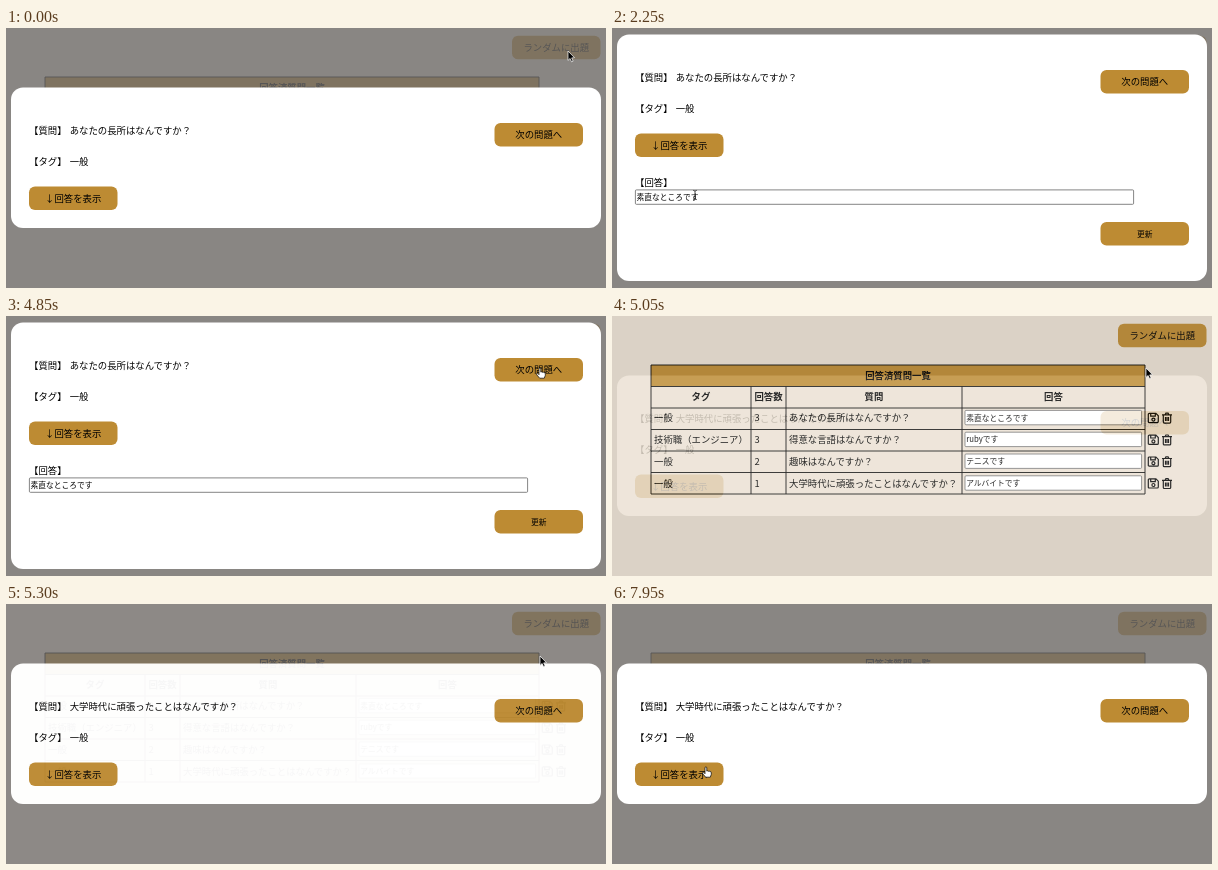
Write an HTML page that moves like this. It is 600 px wide and 260 px high and loops after 8000 ms.

```html
<!DOCTYPE html>
<html lang="ja">
<head>
<meta charset="utf-8">
<style>
html, body { margin: 0; width: 100%; height: 100%; overflow: hidden; }
svg { display: block; width: 100vw; height: 100vh; }
text { font-family: "Noto Sans CJK JP", "Noto Sans CJK", "Noto Sans", sans-serif; font-size: 9.4px; white-space: pre; }
.small { font-size: 7.75px; }
.bold { font-weight: 700; }
.mid { text-anchor: middle; }
</style>
</head>
<body>
<svg id="stage" viewBox="0 0 600 260" xmlns="http://www.w3.org/2000/svg"></svg>
<script>
const LOOP = 8000, STEP = 50;
const OPEN = 2250, CLOSE = 4950, FADE_START = 4945, FADE = 400;
const GOLD = '#bd8b33', PAPER = '#ebe1d3', SHADE = '#6f6e6e', SHADE_ALPHA = 0.78;
const stage = document.getElementById('stage');

// Cursor moves: start, end, target x, target y
const home = [562, 23];
const moves = [
  [300, 1100, 310, 119],
  [1250, 2100, 83, 167],
  [2750, 3050, 150, 131],
  [3250, 3850, 533, 204],
  [3950, 4800, 534, 52],
  [5800, 6050, 402, 89],
  [6250, 6500, 250, 127],
  [6750, 6950, 218, 133],
  [7100, 7950, 94, 163]
];

const clamp = v => Math.max(0, Math.min(1, v));
const swing = v => 0.5 - Math.cos(Math.PI * v) / 2;
const mix = (a, b, k) => a.map((v, i) => v + (b[i] - v) * k);

function el(parent, tag, attrs, body) {
  const node = document.createElementNS('http://www.w3.org/2000/svg', tag);
  for (const key in attrs) node.setAttribute(key, attrs[key]);
  if (body) node.textContent = body;
  return parent.appendChild(node);
}
const set = (node, key, value) => node.setAttribute(key, value);

// y is the middle of the line
function label(parent, x, y, body, cls = '') {
  const drop = cls.includes('small') ? 2.9 : 3.5;
  return el(parent, 'text', { x, y: y + drop, class: cls }, body);
}
function box(parent, x, y, width, height, rx, fill) {
  return el(parent, 'rect', { x, y, width, height, rx, fill });
}
function button(parent, x, y, body, cls = '') {
  box(parent, x, y, 88.5, 23.5, 6, GOLD);
  label(parent, x + 44.2, y + 11.9, body, 'mid ' + cls);
}
function field(parent, x, y, width, body) {
  const rect = box(parent, x, y, width, 14.4, 1, '#fff');
  set(rect, 'stroke', '#666');
  set(rect, 'stroke-width', 0.8);
  label(parent, x + 1.2, y + 7.2, body, 'small');
}

// Page
box(stage, 0, 0, 600, 260, 0, PAPER);
button(stage, 506, 7.8, 'ランダムに出題');
box(stage, 39, 49, 494, 21, 0, GOLD);
label(stage, 286, 59.5, '回答済質問一覧', 'bold mid');
[['タグ', 89], ['回答数', 156.5], ['質問', 262], ['回答', 441.5]]
  .forEach(([name, x]) => label(stage, x, 80.3, name, 'bold mid'));

const rows = [
  ['一般', 3, 'あなたの長所はなんですか？', '素直なところです'],
  ['技術職（エンジニア）', 3, '得意な言語はなんですか？', 'rubyです'],
  ['一般', 2, '趣味はなんですか？', 'テニスです'],
  ['一般', 1, '大学時代に頑張ったことはなんですか？', 'アルバイトです']
];
const SAVE = 'M1 .8h6.6l2.4 2.4v5.8q0 1-1 1h-8q-1 0-1-1v-7.2q0-1 1-1zM2.4 1v2.6h4.6v-2.6M6.6 7a1.5 1.5 0 1 1-3 0a1.5 1.5 0 1 1 3 0';
const TRASH = 'M0 2.3h10M3.1 2.2l.8-1.6h2.2l.8 1.6M1.3 2.5v7q0 1 1 1h5.4q1 0 1-1v-7M3.5 4.5v4M5 4.5v4M6.5 4.5v4';
rows.forEach(([tag, count, question, answer], i) => {
  const y = 101.8 + i * 21.8;
  label(stage, 42, y, tag);
  label(stage, 142.5, y, String(count));
  label(stage, 177, y, question);
  field(stage, 353, y - 7.4, 176.6, answer);
  [[SAVE, 536.3], [TRASH, 550]].forEach(([d, x]) => el(stage, 'path', {
    d, transform: `translate(${x} ${y - 5.2})`, fill: 'none', 'stroke-width': 1.2, stroke: '#000'
  }));
});

let grid = '';
for (let i = 0; i < 7; i++) grid += `M39 ${(49 + i * 21.5).toFixed(1)}H533`;
for (const x of [39, 533]) grid += `M${x} 49V178`;
for (const x of [139, 174, 350]) grid += `M${x} 70.5V178`;
el(stage, 'path', { d: grid, fill: 'none', stroke: '#000', 'stroke-width': 0.9 });

// Dialog over a grey shade, laid out at its closed position
const dialog = el(stage, 'g', {});
set(box(dialog, 0, 0, 600, 260, 0, SHADE), 'opacity', SHADE_ALPHA);
const panel = box(dialog, 5, 59.5, 590, 140.5, 12, '#fff');
const content = el(dialog, 'g', {});
label(content, 23, 102, '【質問】');
const question = label(content, 63.7, 102, rows[0][2]);
label(content, 23, 133.7, '【タグ】');
label(content, 63.7, 133.7, '一般');
button(content, 488.5, 95, '次の問題へ');
button(content, 23, 158.6, '↓回答を表示');
const answer = el(content, 'g', {});
label(answer, 23, 207, '【回答】');
field(answer, 23.4, 214.9, 498.2, rows[0][3]);
button(answer, 488.5, 247, '更新', 'small');

// Cursors
const cursors = {
  arrow: el(stage, 'path', {
    d: 'M0 0V9.4L2.1 7.5L3.6 10.8L5.1 10.1L3.7 6.9L6.5 6.7Z',
    fill: '#000', stroke: '#fff', 'stroke-width': 0.7
  }),
  hand: el(stage, 'path', {
    d: 'M-1 .9q0-1 .9-1t.9 1v3.2q.8-.7 1.6.2q.9-.6 1.5.3q1.4-.3 1.4 1.1v1.6l-1 2.9h-4.6l-2.7-3.1q-1-1.5-.1-1.9q.8-.2 1.6.8l.5.6z',
    fill: '#fff', stroke: '#000', 'stroke-width': 0.7, 'stroke-linejoin': 'round'
  }),
  beam: el(stage, 'path', {
    d: 'M-1.8-4.6Q0-4.6 0-3.4Q0-4.6 1.8-4.6M0-3.4V3.4M-1.8 4.6Q0 4.6 0 3.4Q0 4.6 1.8 4.6M-1 1.2H1',
    fill: 'none', stroke: '#222', 'stroke-width': 0.8
  })
};

function cursorAt(t) {
  let p = home;
  for (const [from, to, x, y] of moves) {
    if (t <= from) break;
    p = mix(p, [x, y], swing(clamp((t - from) / (to - from))));
  }
  return p;
}

function cursorKind([x, y], open) {
  const inside = (l, top, w, h) => x >= l && x <= l + w && y >= top && y <= top + h;
  const dy = open ? -53 : 0;
  if (inside(488.5, 95 + dy, 88.5, 23.5) || inside(23, 158.6 + dy, 88.5, 23.5)) return 'hand';
  if (open && inside(488.5, 194, 88.5, 23.5)) return 'hand';
  return open && inside(23, 162, 499, 14.4) ? 'beam' : 'arrow';
}

function draw(time) {
  const t = Math.floor((time % LOOP) / STEP) * STEP;
  const next = t >= CLOSE;
  const open = t >= OPEN && !next;

  set(dialog, 'opacity', next ? swing(clamp((t - FADE_START) / FADE)) : 1);
  set(panel, 'y', open ? 6.5 : 59.5);
  set(panel, 'height', open ? 246.5 : 140.5);
  set(content, 'transform', `translate(0 ${open ? -53 : 0})`);
  set(answer, 'visibility', open ? 'visible' : 'hidden');
  question.textContent = rows[next ? 3 : 0][2];

  const p = cursorAt(t), kind = cursorKind(p, open);
  for (const name in cursors) {
    set(cursors[name], 'visibility', name === kind ? 'visible' : 'hidden');
    set(cursors[name], 'transform', `translate(${p[0].toFixed(2)} ${p[1].toFixed(2)})`);
  }
}

const start = performance.now();
function tick() {
  draw(performance.now() - start);
  requestAnimationFrame(tick);
}
tick();
</script>
</body>
</html>
```
